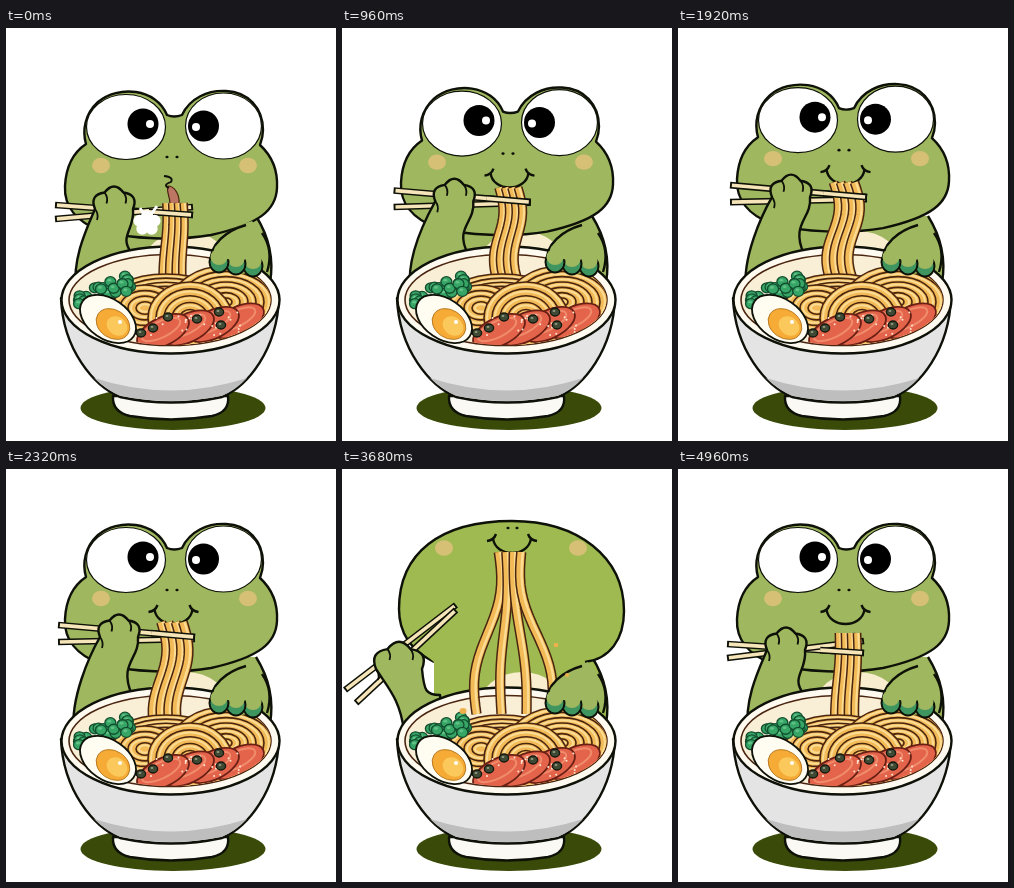
An HTML page with a canvas for the animation above (5.2 s loop, 330x413 px).

```html
<!DOCTYPE html>
<html>
<head>
<meta charset="utf-8">
<title>Frog eating noodles</title>
<style>
html, body { margin: 0; width: 100%; height: 100%; overflow: hidden; background: #fff; }
canvas { display: block; width: 100vw; height: 100vh; }
</style>
</head>
<body>
<canvas width="330" height="413"></canvas>
<script>
const g = document.querySelector('canvas').getContext('2d');
const INK = '#0e1108', SKIN = '#9fb75f', SKIN_UP = '#9eba50', BLUSH = '#d6c076';
const NOODLE = '#f3bb58', GLOSS = '#fbdc94', BROWN = '#4a2510';
const LOOP = 5200, STEP = 80;

// Spans in which the picture moves; it rests between them.
const spans = [[0, 400], [560, 1040], [1120, 1440], [1600, 2080], [2160, 2560], [2720, 2800], [3040, 3040],
  [3200, 3200], [3440, 3520], [3680, 3920], [4400, 4400], [4800, 4800], [4960, 4960]];

const lerp = (a, b, k) => a + (b - a) * k;
const mix = (a, b, k) => a.map((v, i) => lerp(v, b[i], k));
const ramp = (t, a, b) => Math.min(1, Math.max(0, (t - a) / (b - a)));
function random(seed) {
  return () => (seed = seed * 16807 % 2147483647) / 2147483647;
}

function paint(path, fill, line, width = 2.4) {
  const p = typeof path === 'string' ? new Path2D(path) : path;
  if (fill) { g.fillStyle = fill; g.fill(p); }
  if (line) { g.strokeStyle = line; g.lineWidth = width; g.stroke(p); }
}
function oval(x, y, rx, ry, fill, line, width, turn = 0) {
  const p = new Path2D();
  p.ellipse(x, y, rx, ry, turn, 0, 7);
  paint(p, fill, line, width);
}
function at(x, y, draw) {
  g.save();
  g.translate(x, y);
  draw();
  g.restore();
}

// ---- frog ----
function body(up) {
  paint('M92 185 L92 265 L264 265 Q270 220 250 188Z', up ? SKIN_UP : SKIN);
  paint('M250 188 Q270 220 264 255', null, INK);
  oval(180, 240, 44, 37, '#f8edcf');
}

function mouth(x, y) {
  at(x, y, () => paint('M-19 0 C-17 20 17 20 19 0 M-25 3 Q-18 2 -16 -4 M25 3 Q18 2 16 -4', null, INK));
}

function pair(x1, x2, y, r, colour) {
  for (const x of [x1, x2]) oval(x, y, r, r * .85, colour);
}

function head(dy, smile) {
  at(0, dy, () => {
    paint('M161 87 Q168 90 176 87 C184 70 202 62 220 63 C242 64 257 80 257 102 Q257 109 254 117' +
      'C266 128 272 142 271 160 C270 182 254 196 205 207 C170 213 125 211 95 203 C70 194 58 178 59 158' +
      'C60 138 68 124 80 116 C76 102 79 86 92 74 C112 57 150 60 161 87Z', SKIN, INK);
    oval(120, 99, 39.5, 32.5, '#fff', INK, 1.2);
    oval(217.5, 98, 38, 33, '#fff', INK, 1.2);
    oval(137, 96, 15.5, 15.5, '#000');
    oval(197.5, 98, 15.5, 15.5, '#000');
    oval(144, 96, 4, 4, '#fff');
    oval(190, 99, 4, 4, '#fff');
    pair(95, 242, 137.5, 9, BLUSH);
    pair(161, 171, 129, 1.6, INK);
    if (smile) return mouth(167.5, 148);
    paint('M162 158 C168 158 174 166 173 176 L164 176 C164 168 160 164 162 158Z', '#bd7564', BROWN, 1.2);
    paint('M158 148 Q168 149 165 154 Q156 157 163 160', null, INK, 1.8);
  });
}

function headUp() {
  paint('M92 193 C70 182 57 165 57 140 C57 84 98 52 170 52 C236 52 282 88 282 142 C282 170 268 190 243 193',
    SKIN_UP, INK);
  paint('M76 180 L92 193 Q168 212 243 193Z', SKIN_UP);
  pair(102, 236, 79, 9, BLUSH);
  pair(166, 175, 59, 1.6, INK);
  mouth(170, 69);
}

// Arm pose: hand centre x y, hand radius, elbow x, forearm width.
const armLow = [108, 181, 19, 70, 56], armHigh = [113, 172, 19, 68, 58];
const armSide = [57, 200, 23, 62, 36], armDip = [104, 211, 19, 66, 56];

function arm([x, y, r, base, width]) {
  const left = x - r, right = x + r, p = new Path2D();
  const knuckle = (n, k) => [x + r * k * Math.cos(Math.PI * (1 + n / 3)), y + r * k * Math.sin(Math.PI * (1 + n / 3))];
  p.moveTo(base, 262);
  p.bezierCurveTo(base - 4, 230, lerp(left, base, .4), y + 18, left, y);
  for (let n = 0; n < 3; n++) p.quadraticCurveTo(...knuckle(n + .5, 1.5), ...knuckle(n + 1, 1));
  p.bezierCurveTo(right + 2, y + 22, base + width - 14, y + 26, base + width, 226);
  p.lineTo(base + width + 4, 262);
  paint(p, SKIN, INK);
  for (let n = 0; n < 3; n++) {
    const [u, v] = knuckle(n, 1);
    paint(`M${u} ${v} q4 5 2 11`, null, INK, 1.8);
  }
}

function restingHand() {
  paint('M246 193 C225 199 202 214 205 234 L236 246 L262 240 Q266 215 246 193Z', SKIN);
  paint('M240 197 C222 202 202 216 205 236 M256 205 Q268 222 261 244', null, INK);
  for (let n = 2; n >= 0; n--) {
    const x = 213 + n * 17, y = 234 + n * 2;
    oval(x, y, 9.5, 10.5, '#3f9560', INK, 2);
    oval(x, y - 5, 8.5, 8, SKIN);
  }
  oval(231, 222, 23, 10, SKIN);
}

// Chopsticks: upper stick x y x y, then how far lower the other starts and ends.
const sticksLow = [49, 177, 187, 187, 14, -8], sticksHigh = [52, 160, 189, 172, 17, 2];
const sticksBite = [49, 175, 186, 184, 14, -12], sticksSide = [114, 136, 3, 221, 5, 13];
const sticksDip = [37, 206, 200, 264, 13, 15];

function chopsticks([x, y, u, v, d, e], from = 0, count = 2) {
  for (let n = 0; n < count; n++) {
    const a = y + n * d, b = v + n * e, turned = u < x ? n * 11 : 0;
    const line = (s, end) => `M${lerp(x, u + turned, s)} ${lerp(a, b, s)}L${lerp(x, u + turned, end)} ${lerp(a, b, end)}`;
    paint(line(from, 1), null, INK, 6.6);
    paint(line(from || .014, .986), null, '#f6e5b8', 3.6);
  }
}

// ---- hanging noodles ----
// Shape: top x, end x, top width, end width, wave, fan of the wave, top y, end y.
const lifted = [169, 167, 23, 27, 1, 0, 175, 262], bitten = [166, 166, 26, 29, 5, 0, 157, 262];
const sipped = [166, 164, 29, 32, 6, 0, 153, 262], pulled = [168, 148, 33, 40, 6, 0, 83, 262];
const loose = [168, 172, 30, 100, 0, -19, 83, 245], caught = [170, 167, 24, 28, 1, 0, 164, 262];

function strands([x0, x1, w0, w1, wave, fan, y0, y1], sway, cut = 1) {
  const width = w0 / 4 + .4;
  for (let n = 0; n < 4; n++) {
    const o = (n - 1.5) / 4;
    const trace = dx => {
      const p = new Path2D();
      for (let s = 0; s <= 1.001; s += .05) {
        const bend = (wave + fan * o) * Math.sin(2 * Math.PI * s + sway * s);
        p.lineTo(lerp(x0 + o * w0, x1 + o * w1, s) + bend + dx, lerp(y0, lerp(y0, y1, cut), s));
      }
      return p;
    };
    paint(trace(0), null, BROWN, width + 2.4);
    paint(trace(0), null, NOODLE, width - .6);
    paint(trace(width * .2), null, GLOSS, width * .3);
  }
}

function hanging(t) {
  const sway = .5 * Math.sin(t / 130);
  if (t < 1600) strands(mix(lifted, bitten, ramp(t, 480, 1040)), sway);
  else if (t < 2720) strands(mix(bitten, sipped, ramp(t, 1600, 2080)), sway);
  else if (t < 3920) strands(mix(pulled, loose, ramp(t, 2800, 3680)), 0, 1 - ramp(t, 3680, 3920));
  else if (t >= 4960) strands(caught, 0);
}

function drops(t) {
  if (t < 2720 || t >= 3920) return;
  const k = ramp(t, 2800, 3680);
  oval(lerp(135, 121, k), lerp(109, 242, k), 3.5, 3, '#eeb04c');
  oval(lerp(180, 225, k), lerp(212, 206, k), 2, 2, '#eeb04c');
  if (k > .5) oval(214, 176, 2.4, 2.2, '#eeb04c');
}

// ---- bowl and food ----
function bowl() {
  paint('M107 368 Q106 384 124 388 Q165 395 206 388 Q224 384 222 368Z', '#fbf9f4', INK);
  paint('M55 270 C57 322 88 358 114 369 Q165 380 216 369 C242 358 271 322 273 270Z', '#e4e4e5', INK);
  paint('M88 350 Q165 375 241 350 Q229 363 215 368 Q165 378 115 368 Q100 362 88 350Z', '#bebebf');
  oval(164.5, 272, 109, 53.5, '#fffaf0', INK, 2.4);
  oval(164, 272, 101, 45.5, '#f9eed6', BROWN, 1.6);
}

function coil(x, y, rx, ry) {
  for (let d = 0; rx - d > 5; d += 8) {
    const k = 1 - d / rx;
    oval(x, y, rx * k, ry * k, NOODLE, BROWN, 1.6);
    oval(x, y, rx * k - 3, ry * k - 2.6, null, GLOSS, 2);
  }
}

function broccoli() {
  const rnd = random(11);
  for (let n = 0; n < 34; n++) {
    const s = rnd(), x = lerp(73, 124, s), y = lerp(270, 251, s) + rnd() * 16 - 5;
    oval(x, y, 5.5, 5, '#36a566', '#124d2e', 1.3);
    oval(x - 1, y - 1.5, 2, 1.3, '#62c287');
  }
}

function egg() {
  oval(102, 291, 31, 20, '#fffcf2', INK, 1.8, .6);
  oval(107, 296, 18, 14, '#f5ab35', '#b97a22', 1, .6);
  oval(111, 298, 11, 9, '#fbc95b', null, 0, .6);
  oval(114, 294, 2, 2, '#fff');
}

function meat() {
  const rnd = random(7);
  for (let n = 0; n < 4; n++) {
    const x = 232 - n * 25, y = 293 + n * 3.5;
    oval(x, y, 28, 14, '#e3644b', '#6a1f14', 1.8, -.45);
    oval(x - 2, y - 2, 21, 8, null, '#f08b6c', 2, -.45);
  }
  for (let n = 0; n < 30; n++) oval(145 + rnd() * 95, 283 + rnd() * 26, 1, 1, '#ffe6cf');
  for (const [x, y] of [[162, 289], [147, 300], [135, 305], [213, 284], [215, 297], [191, 291]]) {
    oval(x, y, 4.6, 4, '#3f4a35', '#15190f', 1.4);
    oval(x - 1, y - 1, 1.4, 1, '#929a80');
  }
}

function food() {
  g.save();
  const inside = new Path2D();
  inside.ellipse(164, 272, 100.5, 45, 0, 0, 7);
  g.clip(inside);
  coil(160, 278, 62, 32);
  coil(220, 274, 54, 36);
  coil(139, 280, 33, 23);
  coil(184, 290, 42, 36);
  meat();
  g.restore();
  broccoli();
  egg();
}

function puff(t) {
  const k = t / STEP;
  if (k >= 5) return;
  at(141 - k * 2.2, 195 + k * 2.4, () => {
    g.scale(1 + k * .06, 1 + k * .06);
    paint('M-2 -7 L-7 -15 M3 -7 L10 -17', null, '#fff', 2.8);
    oval(0, 0, 9, 8, '#fff');
    for (let n = 0; n < 5; n++) {
      const a = n * Math.PI * .4 - Math.PI / 2;
      oval(8 * Math.cos(a), 7 * Math.sin(a), 6, 6, '#fff');
    }
  });
}

function scene(t) {
  const up = t >= 2720 && t < 4400, side = t >= 2720 && t < 4800;
  const dip = t >= 4800 && t < 4960, bite = t >= 4960;
  const lift = ramp(t, 480, 1040), bob = 4 * ramp(t, 1520, 2080);
  const eating = !side && !dip && !bite;
  const sticks = side ? sticksSide : dip ? sticksDip : bite ? sticksBite : mix(sticksLow, sticksHigh, lift);
  const pose = side ? armSide : dip ? armDip : bite ? armLow : mix(armLow, armHigh, lift);
  if (eating) {
    sticks[1] -= bob;
    sticks[3] -= bob;
    pose[1] -= bob;
  }

  g.fillStyle = '#fff';
  g.fillRect(0, 0, 330, 413);
  oval(167, 380, 92.5, 22, '#3a4b09');
  body(up);
  if (up) headUp(); else head(-4 * lift - bob, t >= 560);
  chopsticks(sticks);
  arm(pose);
  bowl();
  hanging(t);
  food();
  if (dip) chopsticks(sticks, .58);
  else if (!side) chopsticks(sticks, .68, 1);
  restingHand();
  drops(t);
  puff(t);
}

g.lineJoin = 'round';
function tick() {
  const t = performance.now() % LOOP;
  const [, end] = spans.filter(s => s[0] <= t).pop();
  scene(Math.min(Math.floor(t / STEP) * STEP, end));
  requestAnimationFrame(tick);
}
tick();
</script>
</body>
</html>
```
